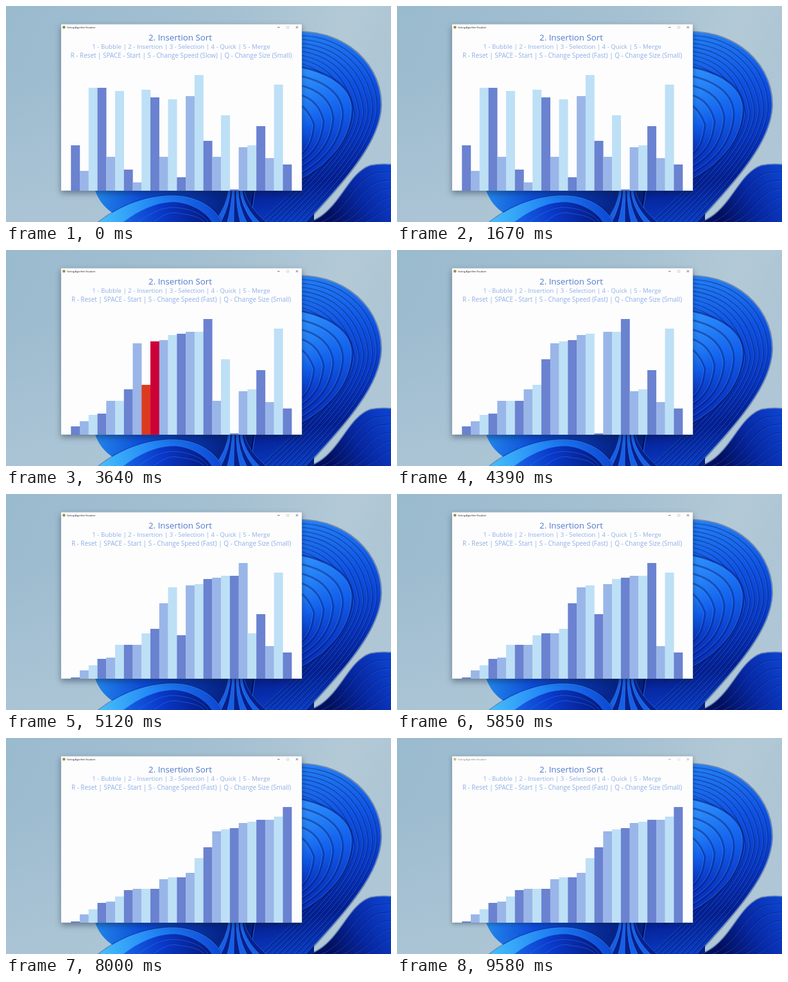
Animation of 600x338 px, one loop 9610 ms. Source, as an HTML page:

```html
<!DOCTYPE html>
<html lang="en">
<head>
<meta charset="utf-8">
<title>Sorting visualizer</title>
<style>
html, body { margin: 0; width: 100%; height: 100%; overflow: hidden; }
svg { display: block; width: 100vw; height: 100vh; }
text { font-family: "Open Sans", sans-serif; }
.head { text-anchor: middle; }
</style>
</head>
<body>
<svg id="stage" viewBox="0 0 600 338" preserveAspectRatio="none">
  <defs>
    <linearGradient id="sky" x1="0" y1="0" x2="1" y2="0.25">
      <stop offset="0" stop-color="#9abace"/>
      <stop offset="0.55" stop-color="#a4c0d1"/>
      <stop offset="0.85" stop-color="#b3c9d6"/>
      <stop offset="1" stop-color="#adc5d4"/>
    </linearGradient>
    <linearGradient id="haze" x1="0" y1="0" x2="0" y2="1">
      <stop offset="0.3" stop-color="#b2c9d8" stop-opacity="0"/>
      <stop offset="1" stop-color="#b2c9d8" stop-opacity="0.6"/>
    </linearGradient>
    <linearGradient id="rim" gradientUnits="userSpaceOnUse" x1="470" y1="40" x2="510" y2="330">
      <stop offset="0" stop-color="#2380f6"/>
      <stop offset="0.3" stop-color="#0f52e2"/>
      <stop offset="0.6" stop-color="#0834be"/>
      <stop offset="0.8" stop-color="#051f92"/>
      <stop offset="1" stop-color="#0a3cc4"/>
    </linearGradient>
    <linearGradient id="core" x1="0.6" y1="0" x2="0.85" y2="1">
      <stop offset="0" stop-color="#2c8dfb"/>
      <stop offset="0.4" stop-color="#1260ec"/>
      <stop offset="0.75" stop-color="#0833c0"/>
      <stop offset="1" stop-color="#031468"/>
    </linearGradient>
    <linearGradient id="side" gradientUnits="userSpaceOnUse" x1="500" y1="320" x2="600" y2="270">
      <stop offset="0" stop-color="#030f5c"/>
      <stop offset="0.5" stop-color="#0728a4"/>
      <stop offset="1" stop-color="#0c41cc"/>
    </linearGradient>
    <linearGradient id="leaf" gradientUnits="userSpaceOnUse" x1="138" y1="290" x2="350" y2="310">
      <stop offset="0" stop-color="#2488ea"/>
      <stop offset="0.35" stop-color="#0d4cd8"/>
      <stop offset="1" stop-color="#05207f"/>
    </linearGradient>
    <linearGradient id="glow" gradientUnits="userSpaceOnUse" x1="150" y1="335" x2="330" y2="310">
      <stop offset="0" stop-color="#43bcfb"/>
      <stop offset="0.5" stop-color="#1f80f4"/>
      <stop offset="1" stop-color="#0d48d4"/>
    </linearGradient>
    <linearGradient id="hollow" gradientUnits="userSpaceOnUse" x1="180" y1="338" x2="320" y2="320">
      <stop offset="0" stop-color="#1766e8"/>
      <stop offset="0.45" stop-color="#0a38c8"/>
      <stop offset="1" stop-color="#04187c"/>
    </linearGradient>
  </defs>
  <rect width="600" height="338" fill="url(#sky)"/>
  <rect width="600" height="338" fill="url(#haze)"/>
  <g id="bloom"></g>
  <rect id="win" x="85.8" y="28.4" width="375.3" height="260.6" fill="#fdfdfe" stroke="#7f909e" stroke-opacity="0.5" stroke-width="0.5"/>
  <g id="chrome">
    <circle id="icon" cx="90.3" cy="33.3" r="2.2"/>
    <text x="95" y="34.7" font-size="3.45" fill="#111">Sorting Algorithm Visualizer</text>
    <g fill="none" stroke="#222" stroke-width="0.6">
      <path d="M423 33.4h3.6M451.8 31.7l3.3 3.3m0-3.3l-3.3 3.3"/>
      <path d="M437.6 31.8h3.2v3.2h-3.2z" opacity="0.3"/>
    </g>
  </g>
  <text class="head" x="271.5" y="54" font-size="13.3" fill="#5079cb">2. Insertion Sort</text>
  <g class="head" fill="#8fafe4">
    <text x="273" y="66.5" font-size="9.7">1 - Bubble | 2 - Insertion | 3 - Selection | 4 - Quick | 5 - Merge</text>
    <text id="keys" x="273" y="80.5" font-size="9.9"></text>
  </g>
  <g id="bars"></g>
</svg>
<script>
const LOOP = 9610;
const BASE = 289;
const LEFT = 101.2, BAR = 13.76;
const COLORS = ['#6a82d0', '#9ab6e8', '#bde0f6'];
const KEY = '#dc3a20', MOVED = '#cc0038';
const SORT_START = 1702, STEP = 33.8;
const tops = [218, 258, 128, 128, 236, 133, 256, 276, 131, 143, 236, 146, 268,
  141, 108, 211, 236, 171, 287, 221, 218, 188, 238, 123, 248];

const $ = id => document.getElementById(id);

function add(parent, tag, attrs) {
  const node = document.createElementNS(parent.namespaceURI, tag);
  for (const name in attrs) node.setAttribute(name, attrs[name]);
  return parent.appendChild(node);
}

// A petal with an optional dark shadow around its edge
function petal(d, fill, edge = 'none', shade = 0) {
  if (shade) {
    add($('bloom'), 'path', { d, fill: 'none', stroke: '#020d58', 'stroke-opacity': 0.35, 'stroke-width': shade });
  }
  add($('bloom'), 'path', { d, fill, stroke: edge, 'stroke-opacity': 0.6, 'stroke-width': 0.8 });
}

function drawBloom() {
  petal('M138 286C145 308 158 320 176 330L190 342H480V286Z', 'url(#leaf)');
  // folds at lower right
  for (let k = 0; k < 6; k++) {
    petal(`M${462 + k * 17} 342C${520 + k * 11} ${330 + k} ${528 + k * 9} ${264 + k * 13} ` +
      `${568 + k * 6} ${250 + k * 13}Q${588 + k * 4} ${246 + k * 13} 612 ${250 + k * 12}V342Z`,
      'url(#side)', '#2a66e6', 3);
  }
  // packed outer bands of the round flower, sweeping down to the stem
  for (let k = 0; k < 9; k++) {
    petal(`M420 ${46 + k * 5}C${510 - k * 2} ${24 + k * 8} ${585 - k * 9} ${82 + k * 5} ${584 - k * 7} ${156 + k * 2}` +
      `C${582 - k * 7} ${215 + k} ${525 - k * 10} ${275 + k * 2} ${464 - k * 9} 342H380Z`,
      'url(#rim)', '#2f86f6', 4);
  }
  // open heart of the flower
  for (let k = 0; k < 5; k++) {
    petal(`M420 ${92 + k * 14}C${482 - k * 7} ${96 + k * 14} ${542 - k * 19} ${118 + k * 9} ${538 - k * 15} ${166 + k * 5}` +
      `C${534 - k * 15} ${220 + k * 2} ${490 - k * 8} ${262 - k * 7} 420 ${288 - k * 9}Z`,
      'url(#core)', '#4ba2ff', 7);
  }
  // narrow stem
  for (let k = 0; k < 8; k++) {
    const x = 322 + k * 11;
    petal(`M${347 + k * 3} 284Q${346 + k * 3} 312 ${x} 342H${x + 11}Q${351 + k * 3} 310 ${350 + k * 3} 284Z`,
      k % 2 ? '#05208c' : '#175fe4', '#3c8df6');
  }
  // arched petal at lower left
  petal('M140 342C175 312 225 294 268 297C306 300 331 322 338 342Z', 'url(#glow)', '#49aefc', 3);
  for (let k = 0; k < 3; k++) {
    petal(`M${178 + k * 24} 342C${207 + k * 17} ${318 + k * 5} ${240 + k * 8} ${304 + k * 8} ${268 + k * 2} ${307 + k * 9}` +
      `C${297 - k} ${311 + k * 8} ${317 - k * 4} ${328 + k * 3} ${323 - k * 6} 342Z`,
      'url(#hollow)', '#2c7ef4');
  }
}

// Insertion sort stopped after a number of swaps
function sortUntil(limit) {
  const list = tops.slice();
  let swaps = 0, key = -1;
  for (let i = 1; i < list.length; i++) {
    for (let j = i; j > 0 && list[j - 1] < list[j]; j--) {
      if (swaps >= limit) return { list, key };
      [list[j - 1], list[j]] = [list[j], list[j - 1]];
      key = j - 1;
      swaps++;
    }
  }
  return { list, key: -1 };
}

function stepAt(t) {
  const stall = Math.min(30, Math.max(0, t - 5135));
  return Math.max(0, Math.floor((t - stall - SORT_START) / STEP));
}

const bars = tops.map((_, i) => add($('bars'), 'rect', { x: LEFT + i * BAR, width: BAR + 0.2 }));

function render(t) {
  const step = stepAt(t);
  const { list, key } = sortUntil(step);
  const flash = key >= 0 && step % 5 === 2;
  bars.forEach((bar, i) => {
    bar.setAttribute('y', list[i]);
    bar.setAttribute('height', BASE - list[i]);
    const mark = flash && (i === key ? KEY : i === key + 1 && MOVED);
    bar.setAttribute('fill', mark || COLORS[i % 3]);
  });

  const speed = t < 640 ? 'Slow' : t < 1000 ? 'Medium' : 'Fast';
  $('keys').textContent = `R - Reset | SPACE - Start | S - Change Speed (${speed}) | Q - Change Size (Small)`;

  const active = t < 9300;
  $('icon').setAttribute('fill', t < 640 ? '#6d9a3e' : '#a58a44');
  $('chrome').setAttribute('opacity', active ? 1 : 0.55);
  $('win').style.filter = active
    ? 'drop-shadow(0 4px 5px rgba(10,25,45,.42))'
    : 'drop-shadow(0 2px 3px rgba(10,25,45,.35))';
}

drawBloom();
const began = performance.now();
function frame() {
  render((performance.now() - began) % LOOP);
  requestAnimationFrame(frame);
}
frame();
</script>
</body>
</html>
```
